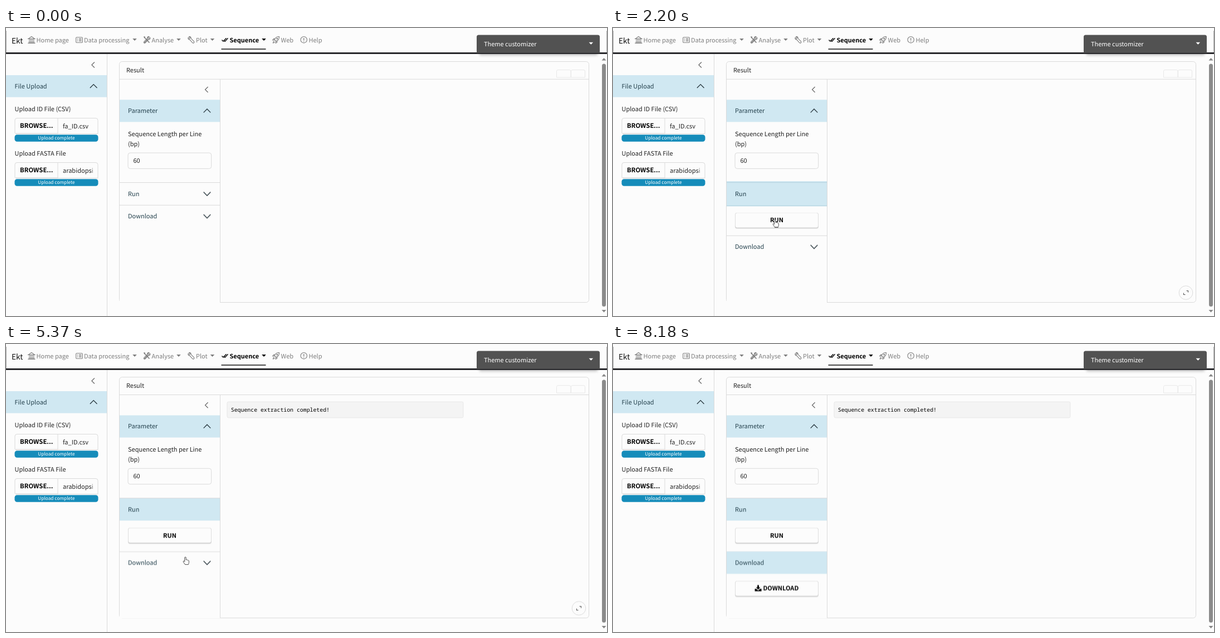
Recreate the animation shown at these times as an HTML page. Size 1079 by 519 pixels, loop 8.28 s.

```html
<!DOCTYPE html>
<html lang="en">
<head>
<meta charset="utf-8">
<title>Sequence extraction</title>
<style>
html, body { margin: 0; width: 100%; height: 100%; overflow: hidden; background: #fcfcfc; }
svg { display: block; }
text {
  font: 11px "Noto Sans CJK SC", "Noto Sans CJK JP", "Noto Sans CJK", "Source Sans Pro", sans-serif;
  fill: #222; white-space: pre; text-rendering: geometricPrecision;
}
.nav text { fill: #7d7d7d; }
.nav .on, .b { font-weight: 700; fill: #000; }
.nav .brand { font-size: 13.7px; fill: #111; }
.small { font-size: 8.3px; fill: #fff; text-anchor: middle; }
.head { fill: #24414d; }
.mono { font: 9.85px "Noto Sans Mono", "DejaVu Sans Mono", monospace; fill: #000; }
.url { font: 8.23px "Open Sans", "Noto Sans", sans-serif; fill: #333; }
.bg { fill: #fcfcfc; }
.blue { fill: #d0e8f2; }
.line { fill: none; stroke: #dadada; }
.chev { fill: none; stroke: #24333a; stroke-width: 1.3; }
.fold { fill: none; stroke: #666; stroke-width: 1.2; }
.icon { fill: none; stroke: #7d7d7d; stroke-width: 1.1; }
.solid { fill: #7d7d7d; }

/* 8280 ms loop; 1% = 82.8 ms */
.a { animation: 8.28s linear infinite both; }
#card { animation-name: card; animation-timing-function: step-end; }
#message { animation-name: message; animation-timing-function: step-end; }
#expand { animation-name: expand; }
#runFill { animation-name: runFill; }
#runRing { animation-name: runRing; }
#runChev { animation-name: runChev; }
#runBtn { animation-name: runBtn; animation-timing-function: step-end; }
#load { animation-name: load; }
#loadFill { animation-name: loadFill; }
#loadRing { animation-name: loadRing; }
#loadChev { animation-name: loadChev; }
#loadBtn { animation-name: loadBtn; animation-timing-function: step-end; }
#cover { animation-name: cover; }
#status { animation-name: status; }
#cursor { animation-name: cursor; }
#hand { animation-name: hand; animation-timing-function: step-end; }
#arrow { animation-name: arrow; animation-timing-function: step-end; }
#runChev, #loadChev { transform-box: fill-box; transform-origin: center; }

@keyframes card { 0% { transform: none; } 62%, 100% { transform: translateY(-.75px); } }
@keyframes message { 0% { opacity: 0; } 49.99%, 100% { opacity: 1; } }
@keyframes expand { 0%, 5% { opacity: 0; } 7%, 98.3% { opacity: 1; } 98.75%, 100% { opacity: 0; } }
@keyframes runFill { 0%, 16.9% { opacity: 0; } 18.7%, 100% { opacity: 1; } }
@keyframes runRing { 0%, 16.9% { opacity: 0; } 18.7%, 27% { opacity: 1; } 29%, 100% { opacity: 0; } }
@keyframes runChev { 0%, 16.9% { transform: none; } 19.4%, 100% { transform: rotate(-180deg); } }
@keyframes runBtn {
  0% { transform: none; } 25.5% { transform: translateY(.75px); }
  29% { transform: translateY(1.5px); } 30.4% { transform: translateY(.75px); }
  33.4%, 100% { transform: none; }
}
@keyframes load {
  0%, 16.9% { transform: none; animation-timing-function: ease; }
  21.1%, 61.99% { transform: translateY(55px); }
  62%, 100% { transform: translateY(55.75px); }
}
@keyframes loadFill { 0%, 67.1% { opacity: 0; } 69%, 100% { opacity: 1; } }
@keyframes loadRing { 0%, 67.1% { opacity: 0; } 69%, 98.3% { opacity: 1; } 98.75%, 100% { opacity: 0; } }
@keyframes loadChev { 0%, 67.1% { transform: none; } 69.6%, 100% { transform: rotate(-180deg); } }
@keyframes loadBtn { 0% { transform: none; } 73.5% { transform: translateY(.75px); } 84%, 100% { transform: none; } }
@keyframes cover {
  0%, 67.1% { transform: none; animation-timing-function: ease; }
  71.4%, 100% { transform: translateY(92px); }
}
@keyframes status { 0%, 79.4% { opacity: 0; } 80.6%, 89% { opacity: 1; } 90.2%, 100% { opacity: 0; } }
@keyframes cursor {
  0%, 2% { transform: translate(612px, -16px); animation-timing-function: cubic-bezier(.4, 0, .5, 1); }
  12% { transform: translate(298px, 303px); }
  13.5%, 15% { transform: translate(300px, 303px); }
  15.2%, 21.5% { transform: translate(301px, 304px); animation-timing-function: ease-in-out; }
  26.5%, 30.5% { transform: translate(291px, 345.5px); animation-timing-function: ease-in-out; }
  33.4%, 55% { transform: translate(327px, 352.5px); animation-timing-function: ease-in-out; }
  59.8%, 69.5% { transform: translate(322px, 384px); animation-timing-function: ease-in-out; }
  75% { transform: translate(277px, 453.5px); }
  76.2%, 77.2% { transform: translate(286px, 445px); }
  77.9%, 82.2% { transform: translate(287px, 446px); animation-timing-function: ease-in; }
  87.4%, 87.9% { transform: translate(618px, 123px); animation-timing-function: ease-out; }
  92% { transform: translate(716px, -4px); }
  93.2%, 100% { transform: translate(719px, -16px); }
}
@keyframes hand { 0% { opacity: 0; } 9.9% { opacity: 1; } 84.6%, 100% { opacity: 0; } }
@keyframes arrow { 0% { opacity: 1; } 9.9% { opacity: 0; } 84.6%, 100% { opacity: 1; } }
</style>
</head>
<body>
<svg width="1079" height="519" viewBox="0 0 1079 519">
  <defs>
    <g id="button">
      <rect width="150" height="29" rx="4" fill="#d6d6d6"/>
      <rect x=".8" y=".6" width="148.4" height="26.2" rx="3.5" class="bg"/>
    </g>
    <path id="caret" d="M-3.8-2H3.8L0 2Z"/>
    <path id="down" d="M-6.3-3.2 0 3.2 6.3-3.2"/>
    <path id="up" d="M-6.3 3.2 0-3.2 6.3 3.2"/>
    <path id="back" d="M2.6-5-2.4 0 2.6 5"/>
    <g id="picker">
      <path class="line" stroke="#e4e4e4" d="M93 .5H161Q165 .5 165 4.5V28.5H93M16 28V4Q16 .5 20 .5H93V28.5"/>
      <path class="line" stroke-width="1.6" d="M17 28.4H93"/>
      <text class="b" style="font-size:11.3px" x="25" y="17.5">BROWSE...</text>
      <rect x="15.5" y="30.3" width="150" height="12.4" rx="4.5" fill="#158cba"/>
      <text class="small" x="90.5" y="39.4">Upload complete</text>
    </g>
    <clipPath id="inside"><rect x="204" y="93" width="842" height="401.5"/></clipPath>
    <filter id="soft" x="-10%" y="-40%" width="120%" height="200%"><feGaussianBlur stdDeviation="2.5"/></filter>
  </defs>

  <rect class="bg" width="1079" height="519"/>

  <g class="nav">
    <path d="M.3 5V45M1078.7 5V45" stroke="#555" stroke-width=".6"/>
    <text class="brand" x="10" y="27.8">Ekt</text>
    <path class="icon" d="M40 19.5 45.8 15.5 51.6 19.5ZM42 20V25.5M44.6 20V25.5M47.2 20V25.5M49.8 20V25.5M40.4 25.7H51.4M39.4 27.4H52.4"/>
    <text x="54.5" y="25.5">Home page</text>
    <g class="icon">
      <rect x="125.7" y="16.8" width="11.6" height="9.4" rx="1.3"/>
      <path d="M128 19.4H129.2M131 19.4H135.4M128 21.6H129.2M131 21.6H135.4M128 23.8H129.2M131 23.8H135.4"/>
    </g>
    <text x="140" y="25.5">Data processing</text>
    <use href="#caret" class="solid" x="231" y="21"/>
    <g class="icon">
      <path d="M248 16.5 257.5 26.5M247.3 15.8 250 16.5" stroke-width="1.6"/>
      <path d="M248.5 26.5 255 19.6M258.5 17.2 256.3 19.3 254.8 17.8 257 15.6C255 14.8 253 16.6 253.6 18.8L247.6 25C247 27 248.6 27.8 250 26.8L255.6 20.8C258 21.2 259.4 19 258.5 17.2Z"/>
    </g>
    <text x="261.5" y="25.5">Analyse</text>
    <use href="#caret" class="solid" x="310" y="21"/>
    <path class="icon" d="M327.2 17.2 329.4 19.3 330.9 17.8 328.7 15.6C330.7 14.8 332.8 16.6 332.2 18.8L337.6 24.4C338.6 26.4 336.6 27.8 335 26.8L329.8 20.8C327.6 21.2 326.3 19 327.2 17.2Z"/>
    <text x="341" y="25.5">Plot</text>
    <use href="#caret" class="solid" x="370.5" y="21"/>
    <path d="M387.5 21.5 390 24 395.5 18.3M391.8 23 393 24.2 398.5 18.3" fill="none" stroke="#000" stroke-width="1.4"/>
    <text class="on" x="401.5" y="25.5">Sequence</text>
    <use href="#caret" x="463" y="21"/>
    <path d="M386.5 38H466.5" stroke="#111" stroke-width="1.5"/>
    <g class="icon">
      <path d="M490.5 15.5C486.5 15.3 483.5 17.5 482 21L485 24C488.5 22.5 490.8 19.5 490.5 15.5ZM483 19.4 480.4 19.2 478.8 21.8 482 21.4M486.6 23 486.8 25.6 484.2 27.2 484.6 24M481.4 23.6C480 24 479.6 25.4 479.4 27 481 26.8 482.2 26.2 482.6 24.8"/>
      <circle cx="486.8" cy="19.2" r=".9"/>
      <circle cx="534.7" cy="21.2" r="5.7"/>
      <path d="M534.7 18V22.2M534.7 23.4V24.7" stroke-width="1.3"/>
    </g>
    <text x="493.5" y="25.5">Web</text>
    <text x="543.5" y="25.5">Help</text>
  </g>

  <rect x="850" y="36" width="212" height="13" fill="#000" opacity=".25" filter="url(#soft)"/>
  <rect y="44" width="1079" height="2.8" fill="#1b1b1f"/>
  <path d="M845 45V16Q845 12.5 848.5 12.5H1062.5Q1066 12.5 1066 16V45Z" fill="#525252"/>
  <text x="858" y="32.5" style="fill:#fff">Theme customizer</text>
  <use href="#caret" x="1050.3" y="27.8" fill="#fff"/>

  <rect x="1070" y="64.5" width="7" height="437.5" rx="3.5" fill="#8b8b8b"/>
  <path d="M1069.5 58.5H1077.5L1073.5 54ZM1069.5 508H1077.5L1073.5 512.5Z" fill="#858585"/>

  <path class="line" d="M181.5 47V519"/>
  <use href="#back" class="fold" x="156.3" y="66.5"/>
  <rect class="blue" y="85" width="181" height="39.6"/>
  <text class="head" x="15.5" y="109">File Upload</text>
  <use href="#up" class="chev" x="157.2" y="104.8"/>
  <text x="15.5" y="150.3">Upload ID File (CSV)</text>
  <use href="#picker" y="162"/>
  <text x="102" y="181">fa_ID.csv</text>
  <text x="15.5" y="230.3">Upload FASTA File</text>
  <use href="#picker" y="242"/>
  <svg x="93" y="242" width="62.5" height="28"><text x="9" y="19">arabidopsis</text></svg>

  <g id="card" class="a">
    <rect class="line" x="203.5" y="60.5" width="843" height="434" rx="5"/>
    <text x="216" y="80">Result</text>
    <path class="line" d="M204 92.3H1046M384.5 92.5V494"/>
    <path class="line" style="stroke:#e8e8e8" d="M988.5 89V78Q988.5 75.5 991 75.5H1011.5Q1014 75.5 1014 78V89ZM1014.5 89V78Q1014.5 75.5 1017 75.5H1037Q1039.5 75.5 1039.5 78V89Z"/>
    <use href="#back" class="fold" x="360" y="111"/>
    <rect class="blue" x="204" y="129.3" width="180" height="40"/>
    <text class="head" x="219" y="153">Parameter</text>
    <use href="#up" class="chev" x="361" y="149.2"/>
    <text x="219" y="194.6">Sequence Length per Line</text>
    <text x="219" y="213.2">(bp)</text>
    <rect class="line" x="219" y="225" width="149.7" height="28.4" rx="4"/>
    <text x="228.5" y="243.2">60</text>

    <g clip-path="url(#inside)">
      <g id="runBtn" class="a">
        <use href="#button" x="219" y="332"/>
        <text class="b" x="294" y="349.7" text-anchor="middle">RUN</text>
      </g>
      <g id="load" class="a">
        <rect class="bg" x="204" y="319" width="180" height="260"/>
        <path class="line" d="M204 319.3H384"/>
        <g id="loadBtn" class="a">
          <use href="#button" x="219" y="372"/>
          <path d="M259.2 379.5H262V383.4H264.6L260.6 387.4 256.6 383.4H259.2ZM254.6 386.2H257.2L260.6 389.2 264 386.2H266.6V390.6H254.6Z"/>
          <text class="b" x="269.5" y="389.3">DOWNLOAD</text>
        </g>
        <rect id="cover" class="a bg" x="204" y="360" width="180" height="220"/>
        <g id="loadRing" class="a">
          <rect class="blue" x="204" y="316.2" width="180" height="45.6"/>
          <path d="M204 318.4H384M204 360.4H384" stroke="#b3d1de"/>
        </g>
        <rect id="loadFill" class="a blue" x="204" y="319" width="180" height="40.2"/>
        <text class="head" x="219" y="343">Download</text>
        <use id="loadChev" href="#down" class="a chev" x="361" y="339.3"/>
      </g>
      <path class="line" d="M204 278.5H384"/>
      <g id="runRing" class="a">
        <rect class="blue" x="204" y="276" width="180" height="45.4"/>
        <path d="M204 278.3H384M204 320.2H384" stroke="#b3d1de"/>
      </g>
      <rect id="runFill" class="a blue" x="204" y="279" width="180" height="40"/>
      <text class="head" x="219" y="302.7">Run</text>
      <use id="runChev" href="#down" class="a chev" x="361" y="298.8"/>
    </g>

    <g id="message" class="a">
      <rect x="397" y="104.8" width="424" height="28.8" rx="2.5" fill="#f4f4f4" stroke="#e7e7e7"/>
      <text class="mono" x="403.8" y="122.4">Sequence extraction completed!</text>
    </g>
    <g id="expand" class="a">
      <circle class="line" cx="1028.5" cy="477" r="12.3"/>
      <path d="M1029.5 473.5H1032.5V476.5M1027.5 480.5H1024.5V477.5" fill="none" stroke="#555" stroke-width="1.1"/>
    </g>
  </g>

  <g id="status" class="a">
    <path d="M0 503.3H355Q358 503.3 358 506.3V519H0Z" fill="#c6c6c6"/>
    <text class="url" x="3.3" y="514">127.0.0.1:4656/session/.../sequence_extract-download_fasta?w=</text>
  </g>

  <g id="cursor" class="a" fill="#fff" stroke="#333" stroke-width=".9" stroke-linejoin="round">
    <path id="arrow" class="a" d="M0 .4V9.6L2.2 7.6 3.8 11 5.2 10.4 3.7 7H6.6Z"/>
    <path id="hand" class="a" d="M-1.2 .9C-1.2-.4 1.2-.4 1.2 .9V5C2 4.4 3.1 4.6 3.3 5.4 4 5 4.9 5.3 5.1 6.1 5.9 5.8 6.4 6.3 6.4 7.2V9.6C6.4 11.4 5.6 12 5.4 13.4H-.6C-1 12.2-3.4 9.8-3.8 8.1-4 7-2.6 6.6-1.9 7.5L-1.2 8.3Z"/>
  </g>
</svg>
</body>
</html>
```
